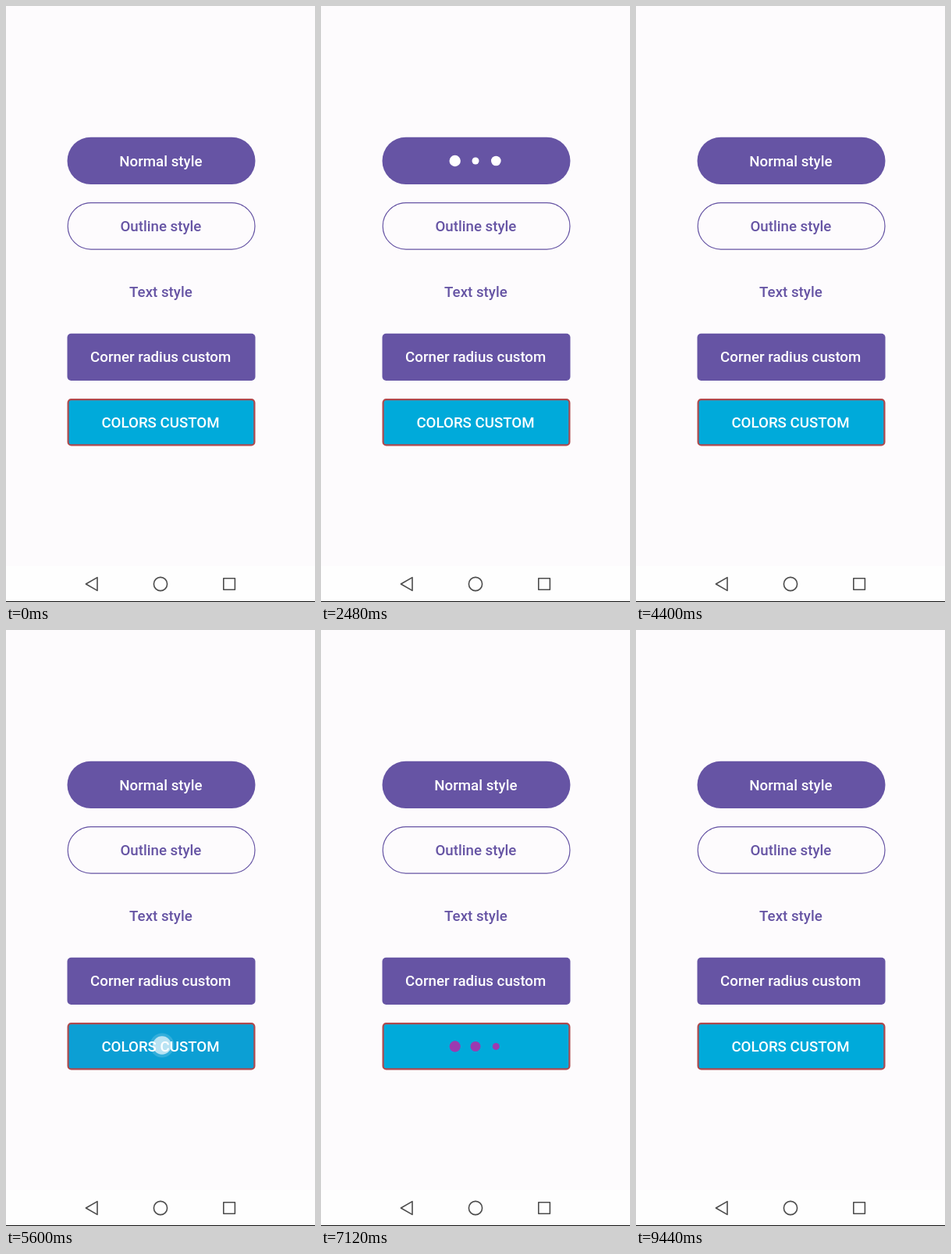
Write an HTML page that moves like this. It is 396 by 762 pixels and loops after 9.52 s.

```html
<!DOCTYPE html>
<html lang="en">
<head>
<meta charset="utf-8">
<title>Button styles</title>
<style>
  html, body { margin: 0; width: 100%; height: 100%; overflow: hidden; background: #fdfbfd; }
  svg { display: block; width: 396px; height: 762px; }
  text { font: 500 18.7px Roboto, sans-serif; text-anchor: middle; }
  .ink { fill: #6654a4; }
  .nav { fill: none; stroke: #4c4c4c; stroke-width: 1.6; stroke-linejoin: round; }
</style>
</head>
<body>
<svg viewBox="0 0 396 762">
  <rect width="396" height="762" fill="#fdfbfd"/>

  <rect class="ink" x="78.5" y="167.8" width="241" height="60.2" rx="30.1"/>
  <rect x="79.2" y="251.7" width="239.8" height="59.4" rx="29.7" fill="none" stroke="#6654a4" stroke-width="1.2"/>
  <rect class="ink" x="78.5" y="418.7" width="241" height="60.2" rx="5"/>
  <rect x="79.6" y="503.2" width="238.8" height="58.2" rx="4" fill="#00aada" stroke="#b0494d" stroke-width="2.2"/>

  <rect id="ripple0" x="78.5" y="167.8" width="241" height="60.2" rx="30.1" fill="#fff" opacity="0"/>
  <rect id="ripple1" x="80.7" y="504.3" width="236.6" height="56" rx="3" fill="#6750a4" opacity="0"/>

  <text id="label0" x="198.4" y="204.6" fill="#fff">Normal style</text>
  <text class="ink" x="198.4" y="288.2">Outline style</text>
  <text class="ink" x="198.4" y="371.8">Text style</text>
  <text x="198.2" y="455.4" fill="#fff">Corner radius custom</text>
  <text id="label1" x="198" y="538.9" fill="#fff">COLORS CUSTOM</text>

  <g id="dots0" fill="#fff"></g>
  <g id="dots1" fill="#9c3ab0"></g>

  <g id="touch" opacity="0" fill="#fff">
    <circle r="15.5" opacity=".16"/>
    <circle r="11.8" opacity=".66"/>
  </g>

  <rect y="716" width="396" height="45" fill="#fefefe"/>
  <path class="nav" d="M117 730.6V747.4L102.4 739Z"/>
  <circle class="nav" cx="198" cy="739" r="8.6"/>
  <rect class="nav" x="278.8" y="731.7" width="14.6" height="14.6"/>
  <rect y="761" width="396" height="1" fill="#111"/>
</svg>
<script>
  const LOOP = 9520, STEP = 80, PULSE = 500, FADE = 200;
  const presses = [
    { x: 202, y: 197, row: 198, down: 960, start: 1200, end: 4240 },
    { x: 200, y: 531, row: 532.4, down: 5440, start: 5680, end: 8720 }
  ];
  const $ = id => document.getElementById(id);
  const set = (el, name, value) => el.setAttribute(name, value);
  const clamp = v => Math.max(0, Math.min(1, v));

  presses.forEach((p, i) => {
    p.label = $('label' + i);
    p.dots = $('dots' + i);
    p.ripple = $('ripple' + i);
    p.circles = [171.7, 198, 224.3].map(x => {
      const c = document.createElementNS('http://www.w3.org/2000/svg', 'circle');
      set(c, 'cx', x);
      set(c, 'cy', p.row);
      return p.dots.appendChild(c);
    });
  });

  // Each dot swells for two thirds of the pulse, one third after its neighbour.
  function radius(t, i) {
    const phase = t / PULSE - 0.095 - i / 3;
    const away = Math.abs(phase - Math.round(phase));
    return 4.5 + 4.5 * clamp(1 - 3 * away);
  }

  function draw(t) {
    const touch = $('touch');
    set(touch, 'opacity', 0);
    presses.forEach(p => {
      const busy = t >= p.start && t < p.end;
      p.label.style.display = busy ? 'none' : '';
      p.dots.style.display = busy ? '' : 'none';
      p.circles.forEach((c, i) => set(c, 'r', radius(t, i)));

      const rise = clamp((t - p.down) / 80);
      const fall = clamp((p.start + FADE - t) / FADE);
      const press = rise * fall;
      set(p.ripple, 'opacity', 0.12 * rise * clamp((p.start + 80 - t) / 80));
      if (press > 0) {
        set(touch, 'transform', `translate(${p.x} ${p.y})`);
        set(touch, 'opacity', press * press);
      }
    });
  }

  const origin = performance.now();
  function tick(now) {
    const t = Math.max(0, now - origin) % LOOP;
    draw(Math.floor(t / STEP) * STEP);
    requestAnimationFrame(tick);
  }
  draw(0);
  requestAnimationFrame(tick);
</script>
</body>
</html>
```
